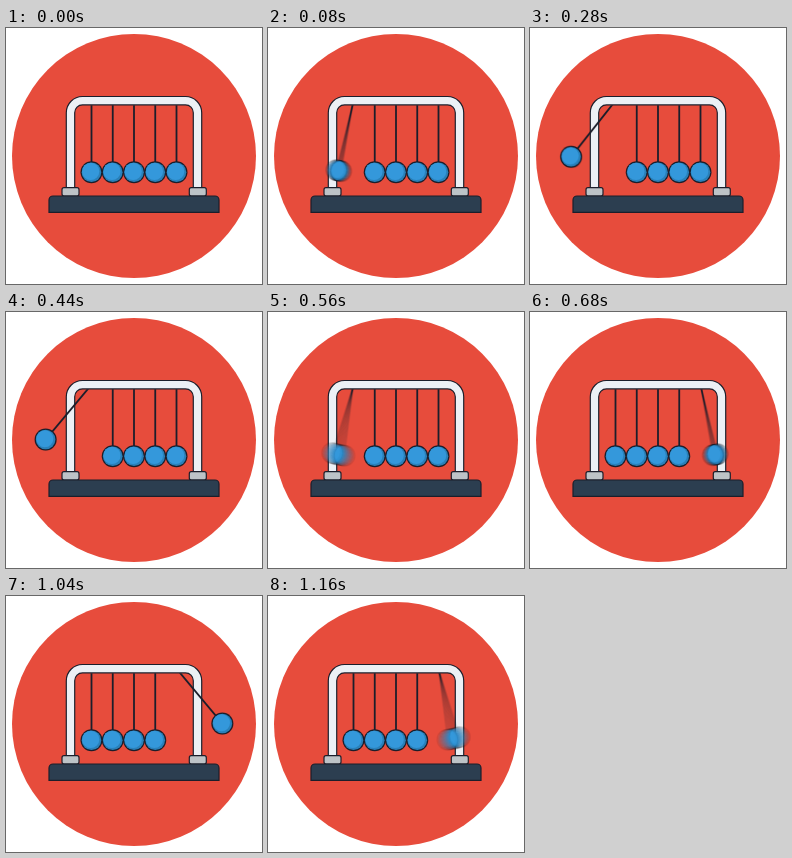
Animation, 256 px wide and 256 px high, one loop 1200 ms. Source, as an HTML page with a canvas:

```html
<!DOCTYPE html>
<html lang="en">
<head>
<meta charset="utf-8">
<title>Newton's cradle</title>
<style>
  html, body { margin: 0; width: 100%; height: 100%; overflow: hidden; background: #fff; }
  canvas { display: block; width: 100vmin; height: 100vmin; }
</style>
</head>
<body>
<canvas id="stage"></canvas>
<script>
const LOOP = 1200, STEP = 40, SHUTTER = 20, SAMPLES = 12;
const PIVOT_Y = 72.7, LENGTH = 71.5, MAX_ANGLE = 40 * Math.PI / 180;
const INK = '#1b1e2b';

const stage = document.getElementById('stage');
const scale = Math.min(innerWidth, innerHeight) / 256 * (devicePixelRatio || 1);
const buffer = document.createElement('canvas');
stage.width = stage.height = buffer.width = buffer.height = Math.round(256 * scale);
const out = stage.getContext('2d');
const g = buffer.getContext('2d');
g.scale(scale, scale);

function disc(x, y, r, fill) {
  g.beginPath();
  g.arc(x, y, r, 0, 2 * Math.PI);
  g.fillStyle = fill;
  g.fill();
}

function box(x, y, w, h, radii, fill) {
  g.beginPath();
  g.roundRect(x, y, w, h, radii);
  g.fillStyle = fill;
  g.fill();
  g.strokeStyle = INK;
  g.lineWidth = 1.2;
  g.stroke();
}

function tube(width, color) {
  g.beginPath();
  g.moveTo(64.5, 164);
  g.arcTo(64.5, PIVOT_Y, 128, PIVOT_Y, 12);
  g.arcTo(191.5, PIVOT_Y, 191.5, 164, 12);
  g.lineTo(191.5, 164);
  g.lineWidth = width;
  g.strokeStyle = color;
  g.stroke();
}

function pendulum(x, angle) {
  const bx = x + LENGTH * Math.sin(angle);
  const by = PIVOT_Y + LENGTH * Math.cos(angle);
  g.save();
  g.beginPath();
  g.rect(0, 77.2, 256, 179);
  g.clip();
  g.beginPath();
  g.moveTo(x, PIVOT_Y);
  g.lineTo(bx, by);
  g.lineWidth = 1.8;
  g.strokeStyle = INK;
  g.stroke();
  g.restore();
  disc(bx, by, 11, INK);
  disc(bx, by, 9.8, '#2980b9');
  disc(bx - 0.8, by - 0.8, 8.6, '#3498db');
}

// Fraction of the full swing during one 600 ms half: quick rise, hold, fall.
function swing(t) {
  const clamp = v => Math.min(1, Math.max(0, v));
  const rise = 1 - (1 - clamp((t - 40) / 320)) ** 2.1;
  const fall = clamp((t - 440) / 152) ** 2.4;
  return rise - fall;
}

function scene(t) {
  const half = LOOP / 2;
  const left = t < half ? swing(t) : 0;
  const right = t < half ? 0 : swing(t - half);
  g.fillStyle = '#fff';
  g.fillRect(0, 0, 256, 256);
  disc(128, 128, 122, '#e74c3c');
  tube(9.6, INK);
  tube(7.2, '#ecf0f5');
  for (const x of [56, 183.3]) box(x, 159.7, 17, 8.3, 2, '#bdc3c7');
  box(43, 168, 170, 16.3, [4, 4, 0, 0], '#2c3e50');
  for (let i = 0; i < 5; i++) {
    const a = i === 0 ? -left : i === 4 ? right : 0;
    pendulum(85.5 + 21.25 * i, a * MAX_ANGLE);
  }
}

// Average several moments inside the shutter time for motion blur.
function draw(now) {
  const t = Math.floor(now % LOOP / STEP) * STEP;
  for (let k = 0; k < SAMPLES; k++) {
    scene(t + SHUTTER * k / (SAMPLES - 1));
    out.globalAlpha = 1 / (k + 1);
    out.drawImage(buffer, 0, 0);
  }
  requestAnimationFrame(time => draw(time - start));
}

const start = performance.now();
draw(0);
</script>
</body>
</html>
```
